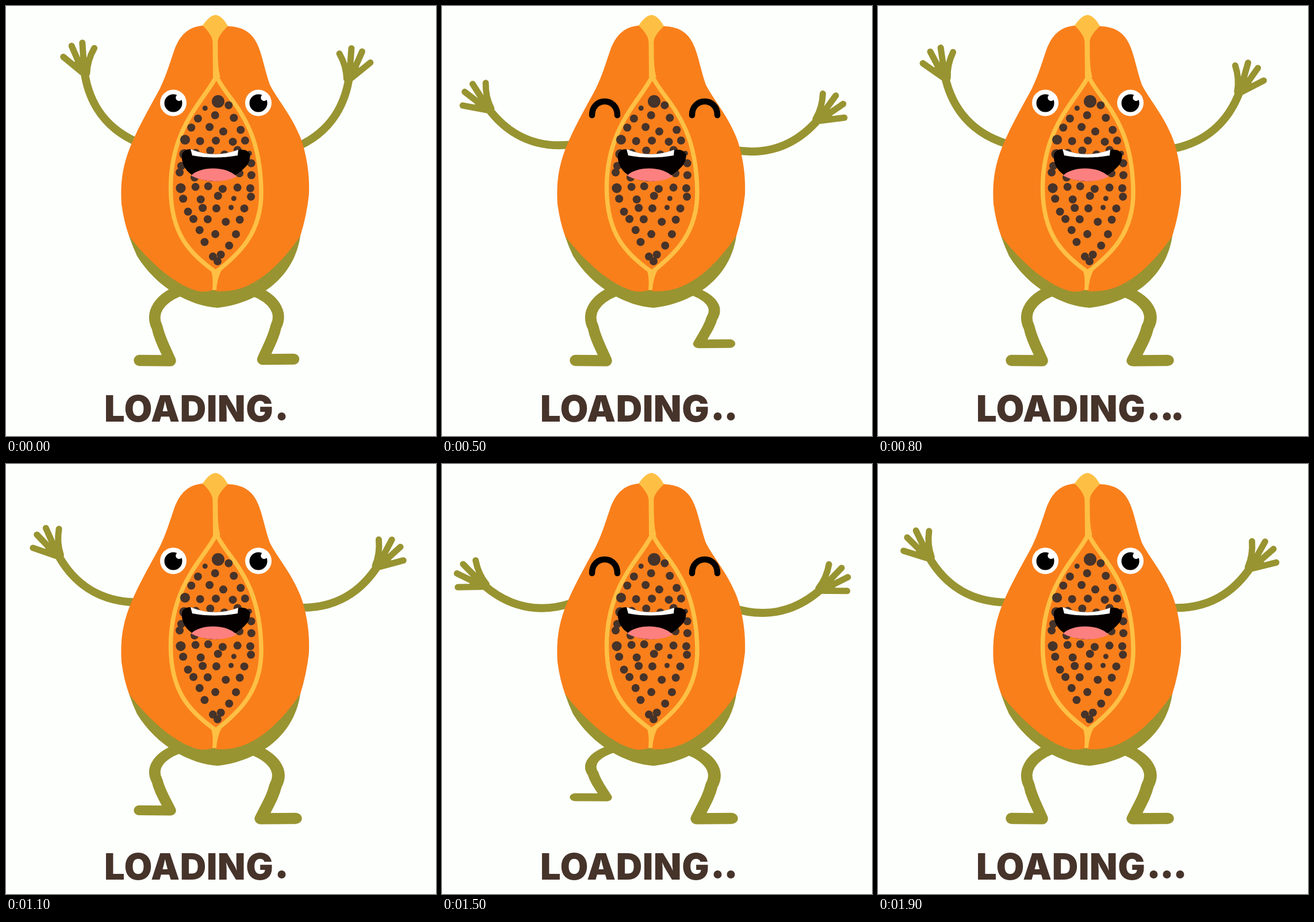
An HTML page with a canvas for the animation above (2000 ms loop, 748x748 px).

```html
<!DOCTYPE html>
<html lang="en">
<head>
<meta charset="utf-8">
<title>Loading</title>
<style>
html, body { margin: 0; width: 100%; height: 100%; overflow: hidden; background: #fdfffd; }
canvas { display: block; width: 748px; height: 748px; }
</style>
</head>
<body>
<canvas id="stage" width="748" height="748"></canvas>
<script>
const ctx = document.getElementById('stage').getContext('2d');
const LOOP = 2000, STEP = 100, MIRROR = 732.5;
const PAPER = '#fdfffd', ORANGE = '#f97f1b', OLIVE = '#989431', YELLOW = '#fec044', BROWN = '#46332a';

// Turning points of the wave: time, left angle, right angle, easing power up to there.
const swings = [
  { at: 0, left: 39.4, right: 39 },
  { at: 400, left: 1, right: -1, power: 0.9 },
  { at: 800, left: 35, right: 27.4, power: 0.9 },
  { at: 1400, left: -7, right: -5, power: 1.4 },
  { at: 1900, left: 17.5, right: 14, power: 0.9 },
  { at: LOOP, left: 39.4, right: 39, power: 1 }
];

const shape = d => new Path2D(d);
const skin = shape('M214,400 Q220,418 228,435 C262,490 320,522 368,525 C430,518 500,480 512,400 Z');
const flesh = shape('M343,34 C316,36 302,52 293,76 C284,102 279,120 268,143 C250,177 224,220 210,262 ' +
  'C202,288 199,310 201,345 Q205,375 214,400 C250,447 300,491 340,497 Q352,497 361,494 ' +
  'Q368,498 392,495 C438,488 479,448 512,400 Q523,365 527,328 C529,290 521,250 511,226 ' +
  'C494,186 473,164 459,137 C450,112 446,84 436,64 Q422,36 386,35 Z');
const stem = shape('M342,34 Q354,16 365,15.5 Q376,17 386,35 Q372,48 369,58 Q368,62 368.5,70 ' +
  'Q368,110 373,124 L360,124 Q360,95 359.5,66 Q360,60 357,53 Q351,42 342,34 Z');
const core = shape('M366,122 C345,165 286,210 286.5,318 C287,395 318,430 365,463 ' +
  'C405,432 445,395 444,322 C442,195 385,165 366,122 Z');
const tail = shape('M356,459 Q361,470 359,494 L366,494 Q367,475 375,459 Z');

const limb = shape('M72,206 C98,230 150,266 228,241');
const fingers = shape('M28,210 L70,210 M27,186 L66,206 M38,170 L70,204 M60,164 Q64,188 78,206');
const palm = shape('M48,212 L49,199 L56,189 L66,188 L83,209 L76,214 Z');
const leg = shape('M300,496 C268,509 250,533 263,559 C267,578 275,592 286,617 L232,616.5');

const mouth = shape('M321,249 Q309,249 306,258 Q305,268 309,277 C316,295 342,305 362,305 ' +
  'C386,305 408,291 420,276 Q426,266 424,257 Q419,248 404,250 Q362,266 321,249 Z');
const teeth = shape('M321,249 Q362,266 404,250 L403,260 Q362,267 324,260 Z');
const tongue = shape('M322,295 C338,278 385,278 401,297 Q384,305 362,305 Q338,304 322,295 Z');
const closedEye = shape('M-22,22 C-22,-10 22,-10 22,22');

function fill(path, color) {
  ctx.fillStyle = color;
  ctx.fill(path);
}

function stroke(path, color, width) {
  ctx.strokeStyle = color;
  ctx.lineWidth = width;
  ctx.stroke(path);
}

function disc(x, y, r, color) {
  ctx.fillStyle = color;
  ctx.beginPath();
  ctx.arc(x, y, r, 0, Math.PI * 2);
  ctx.fill();
}

function within(setup, paint) {
  ctx.save();
  setup();
  paint();
  ctx.restore();
}

function mirrored(dy, paint) {
  within(() => {
    ctx.translate(MIRROR, dy);
    ctx.scale(-1, 1);
  }, paint);
}

function randomizer(seed) {
  return () => (seed = seed * 16807 % 2147483647) / 2147483647;
}

function armAngle(t, side) {
  const i = swings.findIndex(s => t < s.at);
  const a = swings[i - 1], b = swings[i];
  const u = (t - a.at) / (b.at - a.at);
  return a[side] + (b[side] - a[side]) * u ** b.power;
}

// One smooth rise and fall around a peak.
function hop(t, peak, length, height) {
  const u = (t - peak) / length;
  return Math.abs(u) < 0.5 ? height * (1 + Math.cos(2 * Math.PI * u)) / 2 : 0;
}

function drawArm(degrees, shift) {
  const x = 228, y = 234;
  within(() => {
    ctx.translate(x + shift, y);
    ctx.rotate(degrees * Math.PI / 180);
    ctx.translate(-x, -y);
  }, () => {
    stroke(limb, OLIVE, 14);
    stroke(fingers, OLIVE, 11);
    fill(palm, OLIVE);
  });
}

function drawLeg(lift, spread) {
  const footX = 259, hipY = 490;
  within(() => {
    ctx.translate(footX, hipY);
    ctx.scale(spread, 1 - lift / (617 - hipY));
    ctx.translate(-footX, -hipY);
  }, () => stroke(leg, OLIVE, 19.5));
}

// Rows of seeds follow the width of the hollow, with a little jitter.
function drawSeeds() {
  const random = randomizer(29);
  const jitter = size => (random() - 0.5) * size;
  disc(369, 166, 11, BROWN);
  for (let y = 174; y < 440; y += 20) {
    const half = 63 * Math.sin(Math.PI * (y - 140) / 305);
    const gaps = Math.max(1, Math.floor(half / 11.5));
    for (let i = 0; i <= gaps; i++) {
      const pick = random();
      const r = pick > 0.92 ? 8.6 : pick < 0.04 ? 4.5 : 7;
      disc(366 - half + 2 * half * i / gaps + jitter(6), y + jitter(9), r, BROWN);
    }
  }
  disc(368, 444, 7, BROWN);
}

function drawBody() {
  fill(skin, OLIVE);
  fill(flesh, ORANGE);
  fill(stem, YELLOW);
  fill(tail, YELLOW);
  fill(core, ORANGE);
  stroke(core, YELLOW, 7.5);
  drawSeeds();
}

function drawEye(x, shut) {
  if (shut) {
    within(() => ctx.translate(x, 168), () => stroke(closedEye, '#000', 10.5));
  } else {
    disc(x, 168.5, 23, '#fff');
    disc(x, 169, 15.5, '#000');
    disc(x + 10, 159.5, 5.7, '#fff');
  }
}

function drawFace(shut) {
  drawEye(shut ? 283 : 291, shut);
  drawEye(shut ? 457 : 439, shut);
  fill(mouth, '#050000');
  fill(teeth, '#fff');
  fill(tongue, '#fd8080');
}

function drawLabel(beat) {
  ctx.fillStyle = BROWN;
  ctx.font = '900 63px Inter, Roboto, sans-serif';
  ctx.letterSpacing = '0.7px';
  ctx.fillText('LOADING', 171, 723);
  // Each new dot slides out of the one before it.
  let x = 479.5;
  for (const start of [0, 333, 667]) {
    if (beat < start) break;
    if (start) x += 23 * Math.min(1, (beat - start) / 167);
    disc(x, 714, 7, BROWN);
  }
}

function draw(now) {
  let t = Math.floor(now % LOOP / STEP) * STEP;
  if (t === 200) t = 100; // the pose holds for two steps here
  const beat = t % 1000;
  const shift = Math.max(0, 11 - t / 14);
  ctx.fillStyle = PAPER;
  ctx.fillRect(0, 0, 748, 748);
  ctx.lineCap = ctx.lineJoin = 'round';

  drawArm(armAngle(t, 'left'), shift);
  mirrored(9, () => drawArm(armAngle(t, 'right'), shift));
  drawLeg(hop(t, 1400, 1000, 41), 1);
  mirrored(0, () => drawLeg(hop(t, 370, 880, 36.7), t < 700 ? 1 : 1.12));

  drawBody();
  drawFace(beat >= 400 && beat < 700);
  drawLabel(beat);
}

let began;
function tick(now) {
  if (began === undefined) began = now;
  draw(now - began);
  requestAnimationFrame(tick);
}
draw(0);
requestAnimationFrame(tick);
</script>
</body>
</html>
```
